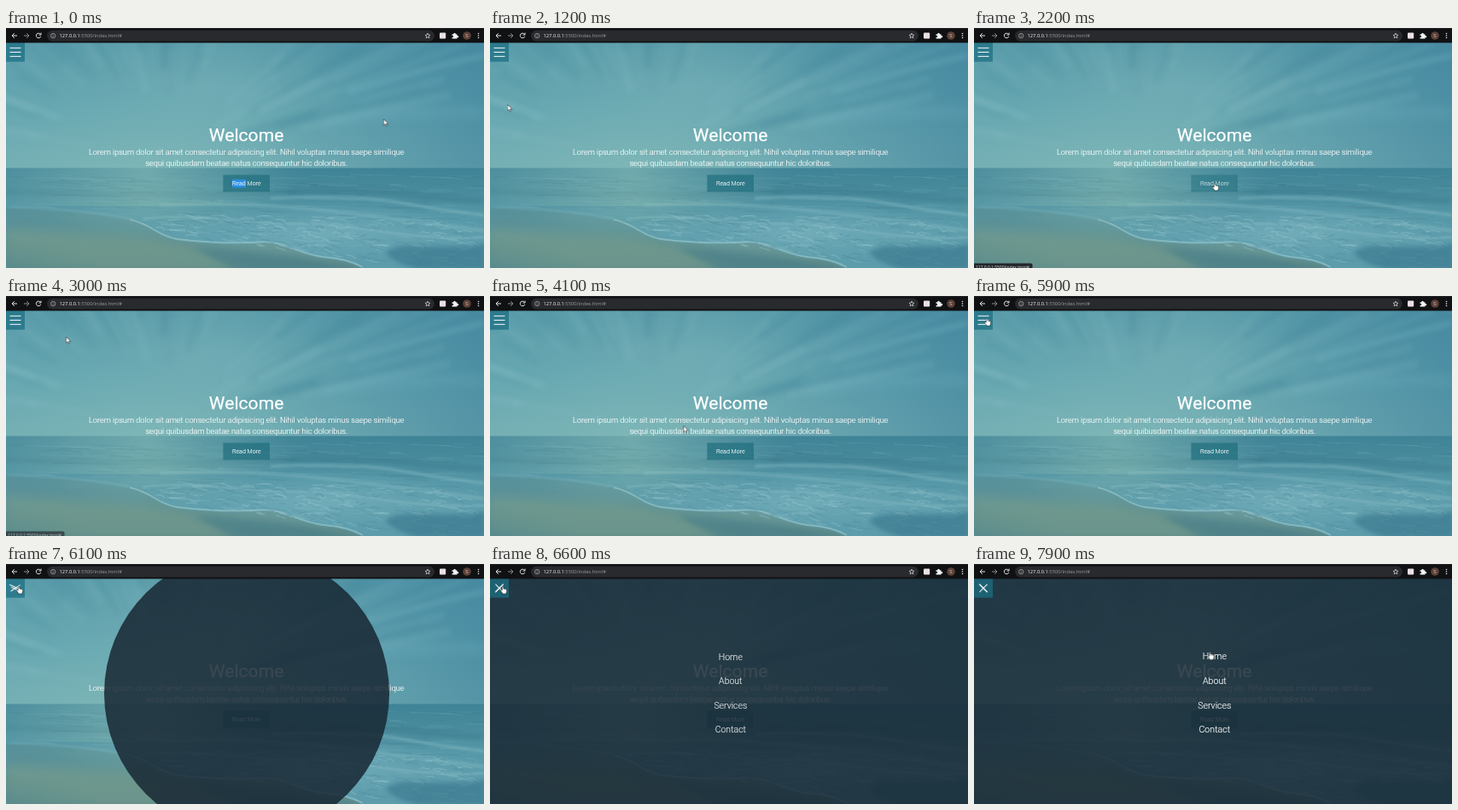
Write an HTML page with a canvas that moves like this. It is 560 px wide and 282 px high and loops after 8 s.

```html
<!DOCTYPE html>
<html lang="en">
<head>
<meta charset="utf-8">
<title>Overlay menu</title>
<style>
html, body { margin: 0; width: 100%; height: 100%; overflow: hidden; background: #101113; }
canvas, svg { position: absolute; left: 0; top: 0; width: 560px; height: 282px; display: block; }
svg { overflow: hidden; }
text { font-family: Roboto, sans-serif; font-weight: 300; fill: #fff; }
.mid { text-anchor: middle; }
.title { font-size: 21.1px; font-weight: 400; }
.lead { font-size: 9.16px; stroke: #fff; stroke-width: .15; }
.label { font-size: 7.08px; stroke: #fff; stroke-width: .12; }
.links text { font-size: 10.6px; stroke: #fff; stroke-width: .15; }
.url, .url tspan { font-family: "Open Sans", sans-serif; font-weight: 400; }
.icon { fill: none; stroke: #e4e6e8; stroke-width: 1; }

.anim, .links, .line, .bars { animation: 8s linear infinite; }
.disc { transform-origin: 282px 152px; animation-name: grow; }
.links { animation-name: reveal; }
.bars { transform-origin: 11px 28.4px; animation-name: spin; }
.line { transform-origin: 11px 28.4px; }
.upper { --y: -4.9px; animation-name: cross; }
.lower { --y: 4.9px; animation-name: cross; }
.mark { animation-name: unselect; animation-timing-function: step-end; }
.btn { animation-name: hover; }
.status { animation-name: status; }
.pointer { animation-name: travel; animation-timing-function: ease-in-out; }
.arrow { animation-name: arrow; animation-timing-function: step-end; }
.hand { animation-name: hand; animation-timing-function: step-end; }

@keyframes grow {
  0%, 74.375% { transform: scale(0); animation-timing-function: ease; }
  83.75%, 100% { transform: scale(1); }
}
@keyframes reveal {
  0%, 79.375% { opacity: 0; animation-timing-function: ease; }
  84.375%, 100% { opacity: 1; }
}
@keyframes spin {
  0%, 74.375% { transform: rotate(0deg); animation-timing-function: ease; }
  79.375%, 90.8% { transform: rotate(225deg); animation-timing-function: ease; }
  95.8%, 100% { transform: rotate(135deg); }
}
@keyframes cross {
  0%, 74.375% { transform: translateY(var(--y)) rotate(0deg); animation-timing-function: ease; }
  79.375%, 100% { transform: translateY(0) rotate(90deg); }
}
@keyframes unselect { 0% { opacity: 1; } 5% { opacity: 0; } 100% { opacity: 0; } }
@keyframes hover {
  0%, 26% { opacity: 1; } 26.5%, 32% { opacity: .7; } 32.5%, 52.5% { opacity: 1; }
  53%, 62.8% { opacity: .7; } 63.4%, 100% { opacity: 1; }
}
@keyframes status {
  0%, 26% { opacity: 0; } 27%, 36.5% { opacity: 1; } 39.5%, 52.5% { opacity: 0; }
  53.5%, 63.5% { opacity: 1; } 66%, 100% { opacity: 0; }
}
@keyframes travel {
  0% { transform: translate(442.5px, 107px); }
  6% { transform: translate(260px, 135px); }
  15% { transform: translate(20.5px, 90px); }
  20% { transform: translate(32px, 76px); }
  27%, 31.25% { transform: translate(282px, 182px); }
  37.5% { transform: translate(70.5px, 48px); }
  42.5% { transform: translate(26px, 43px); }
  47% { transform: translate(62px, 60px); }
  53.5%, 57.5% { transform: translate(281px, 183px); }
  62.5% { transform: translate(21.5px, 31px); }
  67%, 90% { transform: translate(15px, 26px); }
  97%, 100% { transform: translate(276.5px, 103.5px); }
}
@keyframes arrow {
  0% { opacity: 1; } 26.2% { opacity: 0; } 32% { opacity: 1; } 52.8% { opacity: 0; }
  58% { opacity: 1; } 63.2% { opacity: 0; } 90.8% { opacity: 1; } 96% { opacity: 0; } 100% { opacity: 0; }
}
@keyframes hand {
  0% { opacity: 0; } 26.2% { opacity: 1; } 32% { opacity: 0; } 52.8% { opacity: 1; }
  58% { opacity: 0; } 63.2% { opacity: 1; } 90.8% { opacity: 0; } 96% { opacity: 1; } 100% { opacity: 1; }
}
</style>
</head>
<body>
<canvas id="beach" width="560" height="282"></canvas>
<svg viewBox="0 0 560 282">
  <!-- hero -->
  <text class="mid title" x="281.6" y="133.2" stroke="#fff" stroke-width=".25">Welcome</text>
  <text class="mid lead" x="281.8" y="149.4">Lorem ipsum dolor sit amet consectetur adipisicing elit. Nihil voluptas minus saepe similique</text>
  <text class="mid lead" x="281.8" y="162.4">sequi quibusdam beatae natus consequuntur hic doloribus.</text>
  <g class="anim btn">
    <rect x="254.4" y="172.5" width="54.6" height="20" fill="#22707f" fill-opacity=".72"/>
    <text class="mid label" x="281.8" y="185.2">Read More</text>
    <g class="anim mark">
      <rect x="265" y="178" width="16" height="9.5" fill="#2b8fe6"/>
      <text class="label" x="264.8" y="185.2">Read</text>
    </g>
  </g>

  <!-- menu -->
  <g class="anim disc">
    <circle cx="282" cy="152" r="560" fill="#182733" fill-opacity=".85"/>
    <g class="links mid">
      <text x="281.8" y="112.4">Home</text>
      <text x="281.8" y="141">About</text>
      <text x="281.8" y="169.7">Services</text>
      <text x="281.8" y="198.4">Contact</text>
    </g>
  </g>
  <rect y="17" width="22" height="22.6" fill="#1c6f83" fill-opacity=".75"/>
  <g class="bars" fill="#fff">
    <rect x="4.5" y="27.9" width="13" height="1"/>
    <rect class="line upper" x="4.5" y="27.9" width="13" height="1"/>
    <rect class="line lower" x="4.5" y="27.9" width="13" height="1"/>
  </g>

  <g class="anim status">
    <path d="M0 276.6H66.5Q68.5 276.6 68.5 278.6V282H0Z" fill="#24272b"/>
    <text class="url" x="2" y="283" font-size="4.95" style="fill:#d3d7db">127.0.0.1:5500/index.html#</text>
  </g>

  <!-- browser bar -->
  <rect width="560" height="17.4" fill="#101113"/>
  <rect width="560" height="1" fill="#202124"/>
  <rect x="48" y="2.8" width="454" height="12.6" rx="6.3" fill="#292a2d"/>
  <g class="icon">
    <path d="M13 9H7.2M9.8 6.2L7 9l2.8 2.8"/>
    <path d="M21 9h5.8M24.2 6.2L27 9l-2.8 2.8" stroke="#8b8e92"/>
    <path d="M40.4 7.3A2.8 2.8 0 1 0 40.8 9.8M41 5.6V8H38.6"/>
    <circle cx="55.2" cy="9.1" r="2.7" stroke="#b4b7ba" stroke-width=".7"/>
    <path d="M55.2 8.7V10.6M55.2 7.2V7.9" stroke="#b4b7ba" stroke-width=".7"/>
    <path d="M494 6.1l.85 1.95 2.1.2-1.6 1.4.5 2.1-1.85-1.1-1.85 1.1.5-2.1-1.6-1.4 2.1-.2Z" stroke-width=".7"/>
  </g>
  <text class="url" x="62.5" y="11.2" font-size="5.75" style="fill:#f1f3f4">127.0.0.1<tspan fill="#999da2">:5500/index.html#</tspan></text>
  <rect x="508" y="5.4" width="7.2" height="7.2" rx="1" fill="#eadfe2"/>
  <path d="M522.6 7.2h1.8a1.2 1.2 0 1 1 2.3 0h1.8v1.9a1.2 1.2 0 1 1 0 2.1v1.4h-5.9v-1.8a1.1 1.1 0 1 0 0-1.9Z" fill="#f1f3f4"/>
  <circle cx="540" cy="9" r="4.8" fill="#5d4037"/>
  <text class="mid" x="540" y="11" font-size="5.5">S</text>
  <g fill="#e4e6e8">
    <circle cx="553.5" cy="6.5" r=".8"/><circle cx="553.5" cy="9" r=".8"/><circle cx="553.5" cy="11.5" r=".8"/>
  </g>

  <g class="anim pointer" fill="#fff" stroke="#111" stroke-width=".5" stroke-linejoin="round">
    <path class="anim arrow" d="M0 0V7.2L1.7 5.7 2.8 8.3 4 7.8 2.9 5.3H5.2Z"/>
    <path class="anim hand" d="M-.8.6Q0-.5.8.6V3.1L1.6 3Q2 3 2.2 3.4L3 3.3Q3.5 3.3 3.6 3.8 4.6 3.6 4.6 4.5V6.2Q4.5 7.3 3.8 8V9H-.4V8.2L-2.6 5.4Q-2.6 4.3-1.6 4.6L-.8 5.3Z"/>
  </g>
</svg>
<script>
const ctx = document.getElementById('beach').getContext('2d');
let seed = 11;
const rand = () => (seed = seed * 16807 % 2147483647) / 2147483647;

function blend(grad, stops) {
  stops.forEach((c, i) => grad.addColorStop(i / (stops.length - 1), c));
  return grad;
}
const linear = (x0, y0, x1, y1, ...stops) => blend(ctx.createLinearGradient(x0, y0, x1, y1), stops);

function fill(style, y = 0, h = 282) {
  ctx.fillStyle = style;
  ctx.fillRect(0, y, 560, h);
}
function glow(x, y, rx, ry, rgb, alpha) {
  ctx.save();
  ctx.translate(x, y);
  ctx.scale(rx, ry);
  ctx.fillStyle = blend(ctx.createRadialGradient(0, 0, 0, 0, 0, 1),
    [`rgba(${rgb},${alpha})`, `rgba(${rgb},${alpha * .4})`, `rgba(${rgb},0)`]);
  ctx.fillRect(-1, -1, 2, 2);
  ctx.restore();
}
function shape(d, style, blur) {
  ctx.filter = `blur(${blur}px)`;
  ctx.fillStyle = style;
  ctx.fill(new Path2D(d));
  ctx.filter = 'none';
}
function stroke(d, color, width, blur = 0) {
  ctx.filter = blur ? `blur(${blur}px)` : 'none';
  ctx.strokeStyle = color;
  ctx.lineWidth = width;
  ctx.stroke(new Path2D(d));
  ctx.filter = 'none';
}

// Sky, with cloud streaks fanning out from the low sun
fill(linear(0, 17, 0, 166, '#5a9caa', '#66a7b1', '#74afb4'));
fill(linear(270, 40, 560, 0, 'rgba(50,118,150,0)', 'rgba(50,118,150,.5)'), 0, 166);
glow(230, 70, 190, 80, '135,185,188', .35);
for (let i = 0; i < 46; i++) {
  const a = -2.9 + rand() * 2.7, near = 60 + rand() * 130, far = near + 60 + rand() * 120;
  const at = r => `${185 + Math.cos(a) * r * 1.3} ${150 + Math.sin(a) * r * .8}`;
  const tone = rand() < .6 ? '150,200,203' : '62,128,148';
  stroke(`M${at(near)}L${at(far)}`, `rgba(${tone},.14)`, 3 + rand() * 8, 3);
}
stroke('M400 75Q480 50 560 32', 'rgba(150,205,215,.25)', 5, 3);
stroke('M370 112Q470 95 560 100', 'rgba(130,190,203,.2)', 12, 6);

// Sea
fill(linear(0, 164, 0, 245, '#3f8397', '#488b9c', '#5496a6', '#5c9cab'), 164.5, 118);
fill(linear(0, 0, 330, 0, 'rgba(104,163,170,.3)', 'rgba(115,172,174,.6)', 'rgba(104,163,170,0)'), 164, 45);
for (let i = 0; i < 170; i++) {
  const y = 170 + rand() * 62, x = rand() * 560, w = 12 + rand() * 40;
  const tone = rand() < .5 ? '125,182,190' : '55,112,130';
  stroke(`M${x} ${y}q${w / 2} ${rand() * 3 - 1.5} ${w} ${rand() * 2}`, `rgba(${tone},.2)`, .6 + rand(), .4);
}
stroke('M0 192Q90 196 190 196T340 190', 'rgba(60,118,132,.25)', 5, 2);
stroke('M330 193Q420 189 470 196T560 203', 'rgba(55,115,136,.4)', 6, 2.5);
stroke('M310 200Q410 196 460 205T560 220', 'rgba(150,198,207,.45)', 3, 1.5);
stroke('M180 208Q270 204 350 212T560 238', 'rgba(145,195,203,.4)', 3.5, 1.5);

// Wet and dry sand
shape('M0 211Q80 213 145 225C172 231 175 244 200 249Q258 256 306 252C330 254 342 266 372 270Q400 272 420 284H0Z',
  linear(0, 212, 0, 282, '#56909a', '#5c9298', '#618f8d', '#5d8b8b'), 1);
shape('M0 236Q80 240 160 245Q220 256 290 284H0Z', 'rgba(122,160,142,.5)', 6);
shape('M220 258Q300 260 345 270L420 286H270Z', 'rgba(62,120,135,.45)', 3);
glow(0, 282, 110, 38, '75,132,142', .5);

// Foam
glow(370, 240, 200, 36, '140,192,202', .45);
stroke('M0 210.5Q80 212 145 224', 'rgba(150,195,197,.4)', 1.5, .8);
stroke('M145 225C172 231 175 243 200 248Q258 255 306 251C330 253 342 265 372 269Q400 271 418 281', 'rgba(165,208,212,.55)', 1.8, .7);
stroke('M160 225C220 215 285 232 345 230S460 250 560 246', 'rgba(160,204,212,.4)', 1.8, .9);
for (let i = 0; i < 260; i++) {
  const x = 175 + rand() * 375;
  const top = 216 + (x - 175) * .03, low = 240 + (x - 175) * .13;
  const y = top + rand() * (low - top);
  const tone = rand() < .6 ? '165,208,216' : '72,134,153';
  stroke(`M${x} ${y}q${3 + rand() * 6} ${rand() * 8 - 4} ${8 + rand() * 12} ${rand() * 6 - 1}`,
    `rgba(${tone},.28)`, .6 + rand() * 1.2, .4);
}
shape('M444 264Q455 254 490 256T562 254V284H484Q455 276 444 264Z', 'rgba(62,124,146,.75)', 2.5);

// Sunlight
glow(165, 165, 190, 90, '150,200,190', .3);
glow(170, 210, 120, 40, '150,195,178', .25);
</script>
</body>
</html>
```
